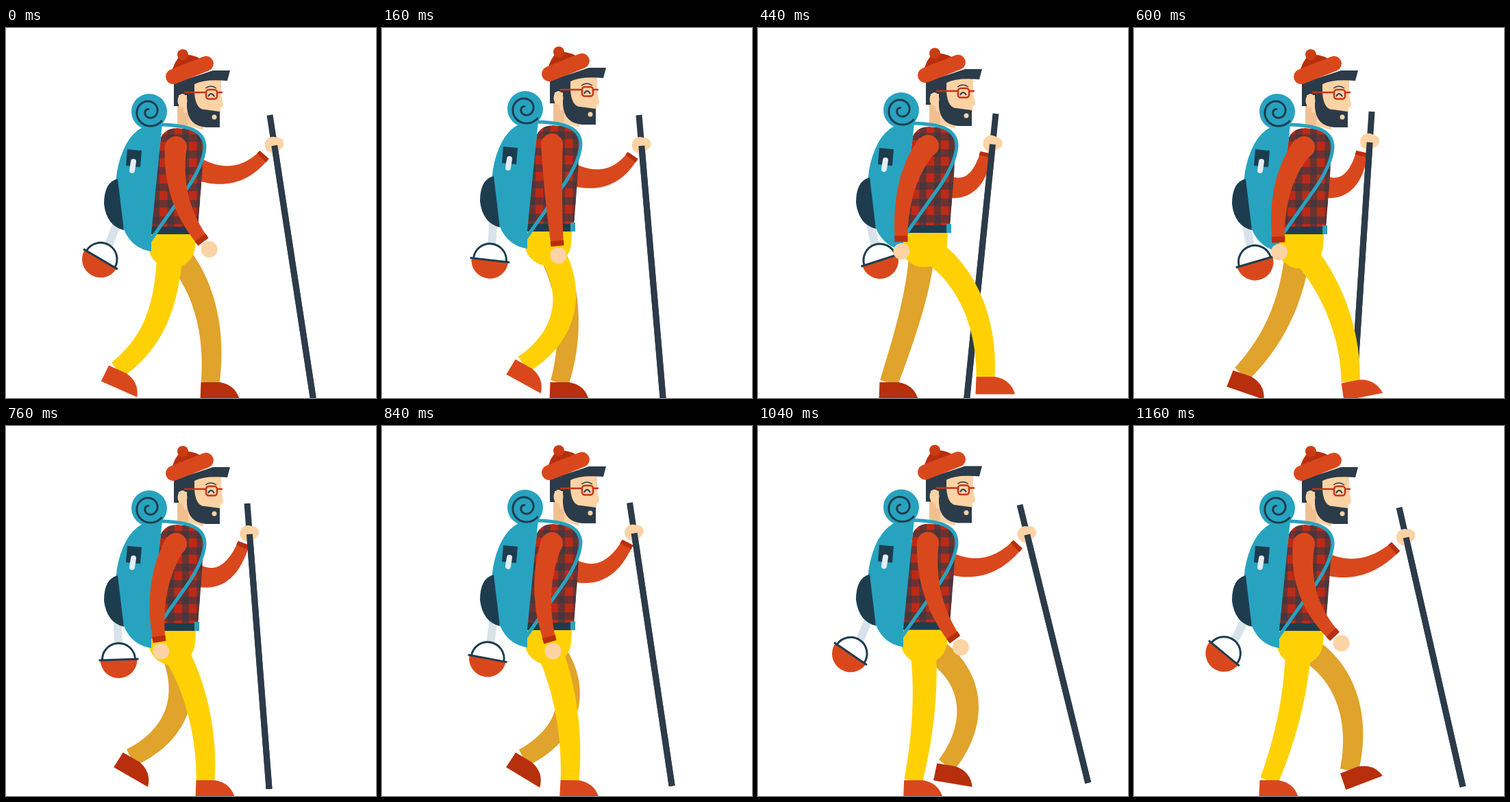
Write an HTML page with a canvas that moves like this. It is 540 by 540 pixels and loops after 1.2 s.

```html
<!DOCTYPE html>
<html>
<head>
<meta charset="utf-8">
<style>
html, body { margin: 0; width: 100%; height: 100%; overflow: hidden; background: #fff; }
canvas { display: block; }
</style>
</head>
<body>
<canvas id="stage" width="540" height="540"></canvas>
<script>
const g = document.getElementById('stage').getContext('2d');
const LOOP = 1200, STEP = 40, RAD = Math.PI / 180;
const C = {
  red: '#d9481c', dark: '#b72f0d', skin: '#fcd3a4', shade: '#f0c093', navy: '#2c3b49',
  ink: '#1d3d4f', teal: '#27a3c0', near: '#ffd105', far: '#e0a32b', pale: '#d8e2e9'
};

// Each row: time, then values.
const nearLeg = [ // thigh control, shin control, ankle, foot angle
  [0, 235, 400, 220, 455, 162, 499, 24],
  [160, 287, 385, 268, 452, 206, 491, 29],
  [280, 322, 365, 318, 442, 259, 493, 22],
  [440, 300, 350, 335, 425, 332, 510, 0],
  [600, 283, 365, 317, 440, 316, 517, -11],
  [760, 274, 370, 294, 445, 291, 518, 0],
  [960, 254, 385, 254, 450, 246, 518, 0],
  [1160, 238, 385, 222, 455, 197, 518, 0]
];
const farLeg = [
  [0, 290, 370, 306, 445, 298, 518, 0],
  [160, 274, 370, 280, 450, 259, 518, 0],
  [440, 236, 385, 212, 455, 191, 518, 0],
  [600, 232, 390, 210, 450, 157, 505, 19],
  [760, 272, 390, 252, 450, 182, 484, 30],
  [960, 320, 365, 312, 440, 248, 491, 25],
  [1160, 307, 350, 332, 425, 314, 503, -21]
];
const nearArm = [ // elbow control, wrist
  [0, 240, 250, 288, 312],
  [160, 249, 249, 256, 322],
  [440, 206, 224, 209, 314],
  [600, 205, 225, 211, 313],
  [760, 211, 235, 224, 317],
  [960, 241, 252, 279, 318],
  [1160, 238, 252, 293, 309]
];
const farArm = [ // shoulder y, elbow control, wrist
  [0, 205, 336, 231, 377, 185],
  [160, 214, 334, 234, 366, 186],
  [440, 232, 320, 241, 333, 182],
  [600, 232, 320, 241, 333, 181],
  [760, 218, 324, 234, 347, 171],
  [960, 201, 334, 223, 375, 171],
  [1160, 201, 334, 221, 382, 176]
];
const pole = [ // top, tilt
  [0, 385, 127, 8.7],
  [160, 375, 127, 4.85],
  [440, 347, 125, -5.8],
  [600, 347, 122, -3.7],
  [760, 352, 113, 4.4],
  [960, 377, 113, 13.3],
  [1160, 387, 119, 12.85]
];
const sway = [ // body height, bowl swing
  [0, 0, 25.5], [160, -4, 5.5], [440, -2, -15], [600, 0, -13.5],
  [760, -2, -1.5], [960, -4, 24], [1160, -2, 33]
];

// Smooth (Hermite) interpolation through the rows.
function at(rows, t) {
  const last = rows.length - 1;
  let i = 0;
  while (i < last - 1 && t >= rows[i + 1][0]) i++;
  const a = rows[i], b = rows[i + 1], d = b[0] - a[0], u = (t - a[0]) / d;
  const slope = (j, k) => {
    const p = rows[Math.max(j - 1, 0)], q = rows[Math.min(j + 1, last)];
    return (q[k] - p[k]) / (q[0] - p[0]);
  };
  return a.slice(1).map((v, n) => {
    const k = n + 1, w = 1 - u;
    return v * (1 + 2 * u) * w * w + b[k] * u * u * (3 - 2 * u)
      + d * u * w * (slope(i, k) * w - slope(i + 1, k) * u);
  });
}

function fill(path, color) { g.fillStyle = color; g.fill(new Path2D(path)); }
function stroke(path, color, width) {
  g.strokeStyle = color; g.lineWidth = width; g.stroke(new Path2D(path));
}
function disc(x, y, r, color) {
  g.fillStyle = color; g.beginPath(); g.arc(x, y, r, 0, 7); g.fill();
}
function group(x, y, deg, draw) {
  g.save(); g.translate(x, y); g.rotate(deg * RAD); draw(); g.restore();
}

function bezier(pts, u) {
  if (pts.length === 1) return pts[0];
  const mix = (p, q) => [p[0] + (q[0] - p[0]) * u, p[1] + (q[1] - p[1]) * u];
  return bezier(pts.slice(1).map((q, i) => mix(pts[i], q)), u);
}

// Tapered band along a curve, from share u0 to its end.
function limb(pts, w0, w1, color, u0 = 0) {
  const n = 28, left = [], right = [];
  for (let i = 0; i <= n; i++) {
    const u = u0 + (1 - u0) * i / n, [x, y] = bezier(pts, u);
    const p = bezier(pts, u - .005), q = bezier(pts, u + .005);
    const a = Math.atan2(q[1] - p[1], q[0] - p[0]), h = (w0 + (w1 - w0) * u) / 2;
    left.push([x - Math.sin(a) * h, y + Math.cos(a) * h]);
    right.unshift([x + Math.sin(a) * h, y - Math.cos(a) * h]);
  }
  fill('M' + left.concat(right).join('L') + 'Z', color);
}

function leg(rows, t, bob, color, shoe) {
  const [ax, ay, bx, by, x, y, deg] = at(rows, t);
  limb([[240, 320 + bob], [ax, ay], [bx, by], [x, y]], 38, 27, color);
  group(x, y, deg, () => fill('M-13.5-1L-14.5 24.5H43Q37 3 14-1Z', shoe));
}

function sleeve(pts, w0, w1) {
  limb(pts, w0, w1, C.red);
  limb(pts, w0, w1 + 1, C.dark, .95);
}

function poleAndArm(t) {
  const [sy, kx, ky, wx, wy] = at(farArm, t), [x, y, deg] = at(pole, t);
  const rod = (from, to) => group(x, y, -deg, () => {
    g.fillStyle = C.navy; g.fillRect(-4.5, from, 9, to - from);
  });
  rod(0, 418);
  sleeve([[278, sy], [kx, ky], [wx, wy]], 32, 17);
  group(x, y, -deg, () => { disc(-2, 44, 12, C.skin); disc(5, 43, 9, C.skin); });
  rod(45, 418);
}

function bowl(deg) {
  const a = deg * RAD, b = deg * 1.2 * RAD;
  const x = 163 - 58 * Math.sin(a), y = 285 + 58 * Math.cos(a);
  stroke(`M163 282L${x + 24 * Math.sin(b)} ${y - 24 * Math.cos(b)}`, C.pale, 12);
  group(x, y, deg * 1.2, () => {
    fill('M-24 0A24 24 0 0 1 24 0Z', '#fff');
    stroke('M-24 0A24 24 0 0 1 24 0', C.ink, 3);
    fill('M-27 0A27 27 0 0 0 27 0Z', C.red);
    stroke('M-29 0H29', C.ink, 3);
  });
}

function shirt() {
  const shape = 'M226 160Q232 146 250 146L274 148Q288 155 288 175L286 215L280 292H208Z';
  g.save();
  g.clip(new Path2D(shape));
  fill(shape, '#bd2a18');
  g.fillStyle = 'rgba(52,58,68,.6)';
  for (let x = 214; x < 290; x += 21.5) g.fillRect(x, 140, 10, 155);
  for (let y = 155; y < 292; y += 24) g.fillRect(205, y, 90, 11);
  g.restore();
  fill('M210 290H279L277 301H208Z', C.ink);
  fill('M275 288H282V301H275Z', C.teal);
}

function backpack() {
  fill('M228 140L212 300V326Q184 322 172 294Q154 240 164 200Q176 152 206 142Z', C.teal);
  fill('M163 220Q143 225 143 257Q147 289 172 295Z', C.ink);
  fill('M177 177L198 179L196 203L175 201Z', C.ink);
  g.lineCap = 'round';
  stroke('M186 195L184 208', '#e3edf2', 8);
  g.lineCap = 'butt';
  disc(209, 122, 26, C.teal);
  g.beginPath();
  for (let d = -270; d <= 325; d += 5) {
    const r = 12 + d / 30;
    g.lineTo(209 + r * Math.cos(d * RAD), 122 - r * Math.sin(d * RAD));
  }
  g.strokeStyle = C.ink; g.lineWidth = 3; g.stroke();
  stroke('M226 141Q258 142 272 148Q294 158 289 182Q284 208 258 243L210 311', C.teal, 5);
}

function head() {
  fill('M250 108H288V149Q268 142 250 142Z', C.skin);
  fill('M250 113H266V142H250Z', C.shade);
  fill('M252 78L314 74V98L317 111Q317 116 313 116V124H260Z', C.skin);
  fill('M245 80L278 70L302 62H327L323 77Q290 74 275 82V98L252 98V114H245Z', C.navy);
  fill('M264 95H275Q277 119 290 119L312 122V145H292Q266 143 264 116Z', C.navy);
  g.fillStyle = C.skin;
  g.beginPath(); g.ellipse(257.5, 106, 7, 10, 0, 0, 7); g.fill();
  disc(304, 130, 3.5, C.skin);
  stroke('M291 88Q299 82 307 88', C.navy, 1.5);
  stroke('M295 100Q299 92 304 100', C.navy, 2);
  stroke('M260 94H292M308 94H316', '#c5341a', 2.5);
  g.strokeStyle = '#c5341a'; g.lineWidth = 2.5;
  g.beginPath(); g.roundRect(292, 90, 16, 13.5, 4); g.stroke();
  fill('M241 68Q245 48 256 39Q276 37 290 50Z', C.dark);
  disc(258, 39, 8, '#cb3c12');
  g.lineCap = 'round';
  stroke('M244 71L292 52', C.red, 22);
  g.lineCap = 'butt';
}

function frontArm(t) {
  const [kx, ky, x, y] = at(nearArm, t), a = Math.atan2(y - ky, x - kx);
  disc(248, 174, 16, C.red);
  disc(x + 14 * Math.cos(a), y + 14 * Math.sin(a), 12, C.skin);
  sleeve([[248, 172], [kx, ky], [x, y]], 32, 18);
}

function draw(t) {
  const [bob, swing] = at(sway, t);
  g.fillStyle = '#fff';
  g.fillRect(0, 0, 540, 540);
  poleAndArm(t);
  leg(farLeg, t, bob, C.far, C.dark);
  group(0, bob, 0, () => bowl(swing));
  leg(nearLeg, t, bob, C.near, C.red);
  group(0, bob, 0, () => {
    disc(242, 317, 34, C.near);
    fill('M212 299H277L276 320H212Z', C.near);
    head();
    shirt();
    backpack();
    frontArm(t);
  });
}

function tick(now) {
  draw(Math.floor(now % LOOP / STEP) * STEP);
  requestAnimationFrame(tick);
}
requestAnimationFrame(tick);
</script>
</body>
</html>
```
